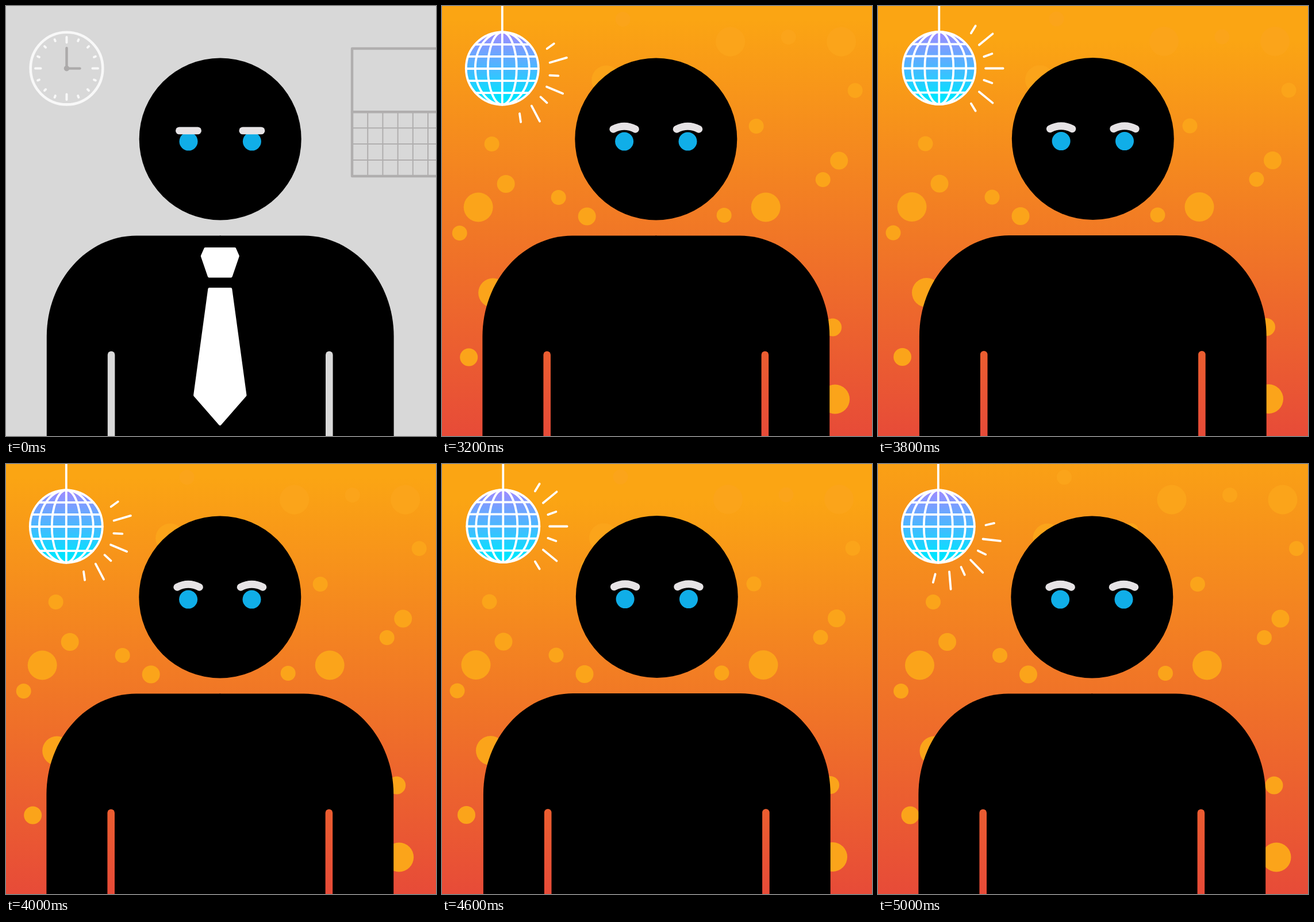
Recreate the animation shown at these times as an HTML page with a canvas. Size 748 by 748 pixels, loop 5.2 s.

```html
<!DOCTYPE html>
<html lang="en">
<head>
<meta charset="utf-8">
<title>Office to party</title>
<style>
html, body { margin: 0; width: 100%; height: 100%; overflow: hidden; background: #d8d8d8; }
canvas { display: block; width: 100%; height: 100%; }
</style>
</head>
<body>
<canvas id="stage" width="748" height="748"></canvas>
<script>
const SIZE = 748, LOOP = 5200, WORK = 3000, BEAT = 200, MID = 372.3;
const c = document.getElementById('stage').getContext('2d');
c.lineCap = c.lineJoin = 'round';

// Key points of the larger dots; the small ones follow a lattice
const BIG = [[511, 62], [704, 62], [295, 129], [72.5, 350], [572.5, 350], [98, 499], [693, 684]];
const MEDIUM = [[700, 269], [120.5, 309.5], [261.5, 366], [689, 559], [56, 611]];
const SMALL = Array.from({ length: 13 }, (_, i) => [(324 + 288 * i) % SIZE, 23 + 31 * i]);

function pen(color, width) {
  c.strokeStyle = color;
  c.lineWidth = width;
}

function line(x1, y1, x2, y2) {
  c.beginPath();
  c.moveTo(x1, y1);
  c.lineTo(x2, y2);
  c.stroke();
}

// Line starting at x, y, running in direction a
function ray(x, y, a, length) {
  line(x, y, x + Math.cos(a) * length, y + Math.sin(a) * length);
}

function disc(x, y, r, color) {
  c.beginPath();
  c.arc(x, y, r, 0, 7);
  c.fillStyle = color;
  c.fill();
}

function ring(rx, ry) {
  c.beginPath();
  c.ellipse(0, 0, rx, ry, 0, 0, 2 * Math.PI);
  c.stroke();
}

function at(x, y, draw) {
  c.save();
  c.translate(x, y);
  draw();
  c.restore();
}

// Draws once as is and once flipped about the body's axis
function mirrored(draw) {
  draw();
  c.save();
  c.translate(2 * MID, 0);
  c.scale(-1, 1);
  draw();
  c.restore();
}

// Symmetric cloth piece from [half width, y] corners
function cloth(...corners) {
  c.beginPath();
  for (const [half, y] of corners) c.lineTo(MID + half, y);
  for (const [half, y] of corners.reverse()) c.lineTo(MID - half, y);
  c.closePath();
  c.fillStyle = '#fff';
  c.fill();
  pen('#fff', 5);
  c.stroke();
}

function clock() {
  pen('#f8f8f8', 4.6);
  ring(62.8, 62.8);
  pen('#f8f8f8', 4);
  for (let i = 0; i < 16; i++) {
    const a = i * Math.PI / 8, inner = i % 4 ? 51.5 : 45;
    ray(Math.cos(a) * inner, Math.sin(a) * inner, a, 54.5 - inner);
  }
  pen('#acaaaa', 4.4);
  line(0, 0, 0, -35.5);
  line(0, 0, 23, 0);
  disc(0, 0, 4.8, '#acaaaa');
}

function calendar() {
  pen('#b0aeae', 2);
  for (let i = 1; i < 6; i++) line(603 + i * 26.2, 185, 603 + i * 26.2, 296);
  for (let i = 1; i < 4; i++) line(602, 184.3 + i * 27.9, 760, 184.3 + i * 27.9);
  pen('#b0aeae', 4.4);
  line(602, 184.3, 760, 184.3);
  c.strokeRect(602, 74, 180, 222);
}

function person(backdrop) {
  disc(MID, 231.5, 141, '#000');
  mirrored(() => {
    c.beginPath();
    c.moveTo(MID - 1, 399.5);
    c.lineTo(518, 399.5);
    c.bezierCurveTo(604, 399.5, 674.2, 478, 674.2, 575);
    c.lineTo(674.2, 760);
    c.lineTo(MID - 1, 760);
    c.fillStyle = '#000';
    c.fill();
    pen(backdrop, 12.6);
    line(561.9, 606.8, 561.9, 760);
  });
}

function face(raised) {
  mirrored(() => {
    const x = 427.5;
    disc(x, 235.6, 16, '#10aee8');
    pen('#e6e3e5', 12.9);
    if (!raised) return line(x - 16, 216.9, x + 16, 216.9);
    c.beginPath();
    c.moveTo(x - 19.3, 214.2);
    c.quadraticCurveTo(x, 204.5, x + 19.3, 214.2);
    c.stroke();
  });
}

function mirrorBall() {
  const glow = c.createLinearGradient(0, -63, 0, 63);
  glow.addColorStop(0, '#a08aff');
  glow.addColorStop(0.5, '#48b8ff');
  glow.addColorStop(0.9, '#00e4ff');
  disc(0, 0, 63, glow);
  pen('#fff', 3.8);
  line(0, -120, 0, 63);
  for (let i = -2; i <= 2; i++) {
    const y = i * 21.1 + 0.5, half = Math.sqrt(63 * 63 - y * y);
    line(-half, y, half, y);
  }
  for (const rx of [25, 47, 63]) ring(rx, 63);
}

function rays(turn) {
  c.rotate(turn);
  for (let i = -3; i <= 3; i++)
    ray(80.8 - 2.8 * i * i, 20.4 * i, i * 0.343, i % 2 ? 15 : 30.5);
}

function office() {
  c.fillStyle = '#d8d8d8';
  c.fillRect(0, 0, SIZE, SIZE);
  at(105.5, 108.6, clock);
  calendar();
  at(0.4, 0, () => {
    person('#d9d9d9');
    face(false);
  });
  cloth([25.5, 422.5], [31, 435], [19, 470]);
  cloth([18.5, 492.5], [43.7, 677], [0, 727]);
}

function party(beat) {
  // Sway runs 0, 1/2, 1, 1/2; lights lag a little behind the rays
  const sway = (1 - Math.cos(beat * Math.PI / 2)) / 2;
  const lag = sway ** 1.4;
  const jolt = beat % 4 ? 0 : 1;

  const sky = c.createLinearGradient(0, 60 - 100 * lag, 0, SIZE);
  sky.addColorStop(0, 'rgb(251,165,19)');
  sky.addColorStop(1, 'rgb(231,75,56)');
  c.fillStyle = sky;
  c.fillRect(0, 0, SIZE, SIZE);

  at(1.5 * jolt, -0.5 * jolt, () => {
    const scatter = (spots, r) =>
      spots.forEach(([x, y]) => disc(x - 15 * (1 - lag), y, r, '#fba41a'));
    scatter(BIG, 25.5);
    scatter(MEDIUM, 15.5);
    scatter(SMALL, 13);
    person(sky);
    face(true);
    at(104.8, 108.5, () => {
      mirrorBall();
      c.translate(2.8 * Math.sin(sway * Math.PI), 0.5);
      rays(0.8 * sway);
    });
  });
}

function frame() {
  const t = performance.now() % LOOP;
  if (t < WORK) office();
  else party(Math.floor((t - WORK) / BEAT));
  requestAnimationFrame(frame);
}
frame();
</script>
</body>
</html>
```
